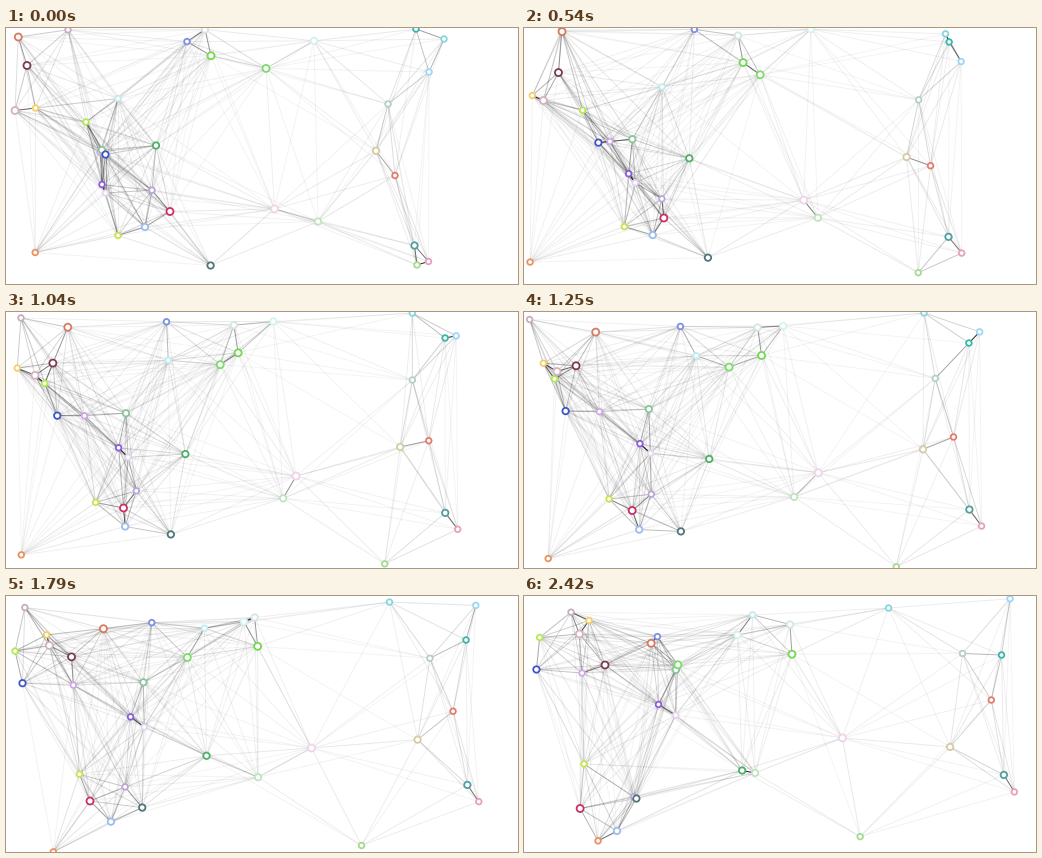
A matplotlib script for the animation above (2.46 s loop, 512x256 px).

```python
import numpy as np
import matplotlib.pyplot as plt
from matplotlib.animation import FuncAnimation
from matplotlib.collections import LineCollection

W, H = 512, 256
DPI = 64
PX = 72 / DPI          # points per pixel
REACH = 195            # longest link, px
TICK = 10              # ms
LOOP = 2460            # ms

# x, y, x speed, y speed (px per step), colour
LARGE = [
    (12.3, 9, 1.98, -.97, "#d9795f"),
    (21, 37.5, 1.035, .543, "#7a3b4e"),
    (9, 82.5, .8, -.767, "#d3b3c3"),
    (205, 27.7, 1.085, .526, "#72d84e"),
    (260, 40.4, -1.83, .49, "#7bdc6b"),
    (164, 183.5, -1.86, .5, "#cc2f68"),
    (268.5, 180.9, .86, -.672, "#f0d3e8"),
]
MEDIUM = [
    (199, 1.5, 1.155, .465, "#d5e6e4"),
    (308, 12.8, -1.63, -.893, "#d3f2f2"),
    (370, 122.8, .967, .485, "#d6cba2"),
    (150, 117.5, 1.175, .983, "#4bb065"),
    (95.8, 122, .967, -.83, "#8ac49a"),
    (99.5, 126.5, -1.93, -.914, "#3e55c8"),
    (139, 199, -.793, .62, "#9bbcf0"),
    (204.6, 237.5, -1.59, -.603, "#50747a"),
    (312, 193.5, -1.395, -.285, "#c0e4bd"),
    (408.5, 217.5, 1.23, -.665, "#4f9f9f"),
]
SMALL = [
    (62, 1.8, -1.88, -.31, "#c8adc0"),
    (29.5, 80, -1.63, -.957, "#f5ce6a"),
    (80, 94, -1.65, -.905, "#b2ea50"),
    (112, 70.5, 2.01, -.89, "#c3ecee"),
    (181, 13.6, -.82, -.935, "#7c8fe6"),
    (410, 1, 1.164, 1, "#38b5ab"),
    (438, 11, -1.267, -.397, "#86d6dc"),
    (423, 44, 1.088, -.805, "#9ed6f5"),
    (382, 76, .975, -.32, "#b3d0c8"),
    (389, 147.5, 1.35, -.75, "#e47a6c"),
    (94, 124, -.62, -.81, "#cfa8ea"),
    (96, 156.5, .664, -.828, "#8a5ce0"),
    (99.5, 165, .9, -.79, "#e6d5ef"),
    (146, 162.2, -.625, .667, "#bba6d8"),
    (112, 207.5, -.897, -.682, "#c5e550"),
    (29.2, 224.5, -1.78, .735, "#e8925f"),
    (422.5, 233.5, 1.17, -.648, "#e8a0c0"),
    (411, 237, -1.29, .593, "#a4db90"),
]

dots = SMALL + MEDIUM + LARGE
start = np.array([d[:2] for d in dots])
speed = np.array([d[2:4] for d in dots])
colors = [d[4] for d in dots]
radius = np.repeat([2.8, 3.2, 3.5], [len(SMALL), len(MEDIUM), len(LARGE)])
first, second = np.triu_indices(len(dots), 1)


def positions(step):
    """Straight paths that bounce off the stage edges."""
    size = np.array([W, H])
    return size - np.abs((start + speed * step) % (2 * size) - size)


def link_alpha(dist):
    """Links fade quickly as their ends move apart."""
    return np.minimum(.85, (12.5 / np.maximum(dist, 1)) ** 1.15)


fig = plt.figure(figsize=(W / DPI, H / DPI), dpi=DPI, facecolor="white")
ax = fig.add_axes([0, 0, 1, 1])
ax.set_xlim(0, W)
ax.set_ylim(H, 0)
ax.axis("off")

links = LineCollection([], linewidths=PX, zorder=1)
ax.add_collection(links)
rings = ax.scatter(start[:, 0], start[:, 1], s=(2 * radius * PX) ** 2,
                   facecolors="white", edgecolors=colors,
                   linewidths=1.8 * PX, zorder=2)


def draw(tick):
    step = (12 * tick + 5) // 50   # 24 steps per second
    pos = positions(step)
    dist = np.hypot(*(pos[first] - pos[second]).T)
    near = dist < REACH
    rgba = np.zeros((near.sum(), 4))
    rgba[:, 3] = link_alpha(dist[near])
    links.set_segments(np.stack([pos[first[near]], pos[second[near]]], axis=1))
    links.set_color(rgba)
    rings.set_offsets(pos)
    return links, rings


anim = FuncAnimation(fig, draw, frames=LOOP // TICK, interval=TICK,
                     repeat=True, repeat_delay=0)
plt.show()
```
